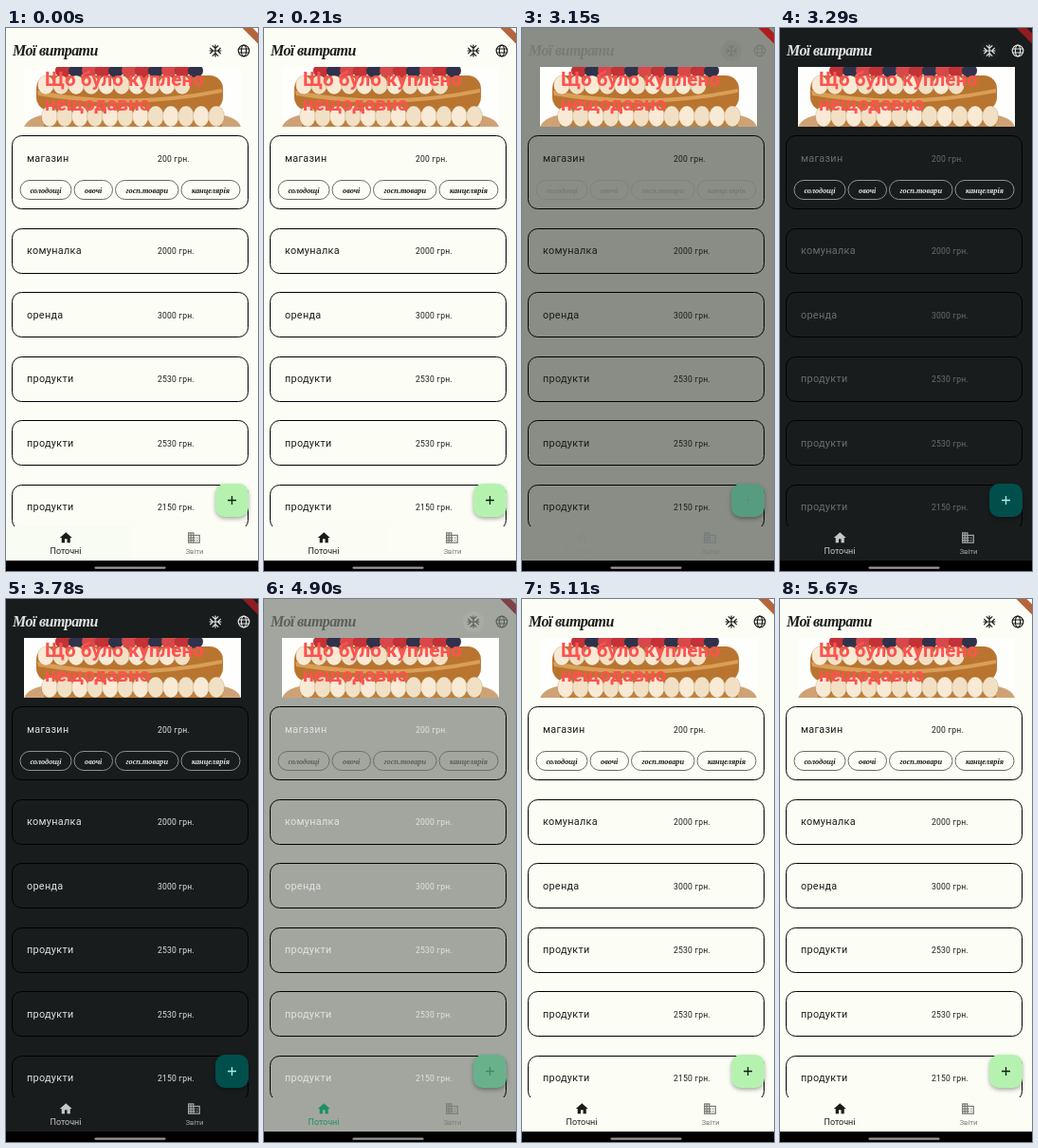
Recreate the animation shown at these times as an HTML page. Size 266 by 572 pixels, loop 8000 ms.

```html
<!DOCTYPE html>
<html lang="uk">
<head>
<meta charset="utf-8">
<style>
  html, body { margin: 0; width: 100%; height: 100%; overflow: hidden; }
  svg { display: block; width: 266px; height: 572px; background: var(--bg); }
  text { font-family: Roboto, "Noto Sans", sans-serif; }
  .script { font: italic bold 16px "Liberation Serif", "Noto Serif", serif; fill: var(--ink); }
  .name { font-size: 10.8px; letter-spacing: .32px; fill: var(--text); }
  .sum { font-size: 8.6px; letter-spacing: .18px; fill: var(--text); }
  .tag { font-size: 8.3px; text-anchor: middle; }
  .head { font-size: 20.6px; font-weight: bold; fill: #ff5151; }
  .card { fill: none; stroke: #000; }
  .chip { fill: none; stroke: var(--chip); }
  .line { fill: none; stroke: var(--ink); stroke-width: 1.2; }
  .mid { text-anchor: middle; }
  .fab { fill: var(--fab); filter: drop-shadow(0 2px 2px #0005); }
</style>
</head>
<body>
<svg viewBox="0 0 266 572">
  <defs>
    <clipPath id="photo"><rect x="19" y="41" width="229" height="63"/></clipPath>
    <clipPath id="view"><rect y="41" width="266" height="484"/></clipPath>
  </defs>

  <text class="script" x="7" y="29" letter-spacing="-.6">Мої витрати</text>
  <circle cx="221" cy="24" r="11" fill="var(--glow)"/>
  <g id="flake" class="line" transform="translate(221 24)"></g>
  <g class="line" transform="translate(251 24)">
    <circle r="5.8"/>
    <ellipse rx="2.6" ry="5.8"/>
    <path d="M-5.3 -2H5.3M-5.3 2H5.3"/>
  </g>
  <path d="M249.5 0H260.4L266 5.6V16.5z" fill="var(--band)"/>

  <g clip-path="url(#photo)">
    <rect x="19" y="41" width="229" height="63" fill="#fefefc"/>
    <path d="M19 104Q24 93 44 91H222Q244 93 248 104z" fill="#cfa275"/>
    <rect x="40" y="84" width="188" height="30" rx="8" fill="#c1803c"/>
    <rect x="32" y="50" width="197" height="37" rx="14" fill="#b9752f"/>
    <path d="M33 66Q130 84 228 64V68Q130 88 34 71z" fill="#d99f58"/>
    <g id="cake"></g>
  </g>
  <text class="head" x="41" y="61">Що було куплено</text>
  <text class="head" x="41" y="87">нещодавно</text>

  <g id="list" clip-path="url(#view)"></g>

  <rect class="fab" x="221" y="480" width="35" height="35" rx="10"/>
  <path d="M234 497.5H243M238.5 493V502" stroke="var(--plus)" stroke-width="1.3"/>

  <rect y="525" width="266" height="36" fill="var(--bg)"/>
  <rect id="press" y="525" width="133" height="36" fill="#2b6b3f"/>
  <path transform="translate(55.5 529.3) scale(.646)" fill="var(--sel)" d="M10 20v-6h4v6h5v-8h3L12 3 2 12h3v8z"/>
  <path transform="translate(190.7 529.3) scale(.646)" fill="var(--off)" fill-rule="evenodd"
    d="M12 7V3H2v18h20V7zM6 19H4v-2h2zm0-4H4v-2h2zm0-4H4V9h2zm0-4H4V5h2zm4 12H8v-2h2zm0-4H8v-2h2zm0-4H8V9h2zm0-4H8V5h2zm10 12h-8v-2h2v-2h-2v-2h2v-2h-2V9h8zm-2-8h-2v2h2zm0 4h-2v2h2z"/>
  <text class="mid" x="63" y="554" font-size="9" fill="var(--sel)">Поточні</text>
  <text class="mid" x="199" y="554" font-size="7.8" fill="var(--off)">Звіти</text>

  <rect y="561" width="266" height="11" fill="#000"/>
  <rect x="93.5" y="567.4" width="75" height="2.4" rx="1.2" fill="#999"/>
</svg>
<script>
const $ = id => document.getElementById(id);

$('flake').innerHTML = [0, 90, 180, 270].map(a =>
  `<path transform="rotate(${a})" d="M0 0V-6.4M-3.2 -5.7L0 -2.5L3.2 -5.7"/>`).join('');

// A row of cream or berry shapes
const dots = (from, to, step, y, rx, ry, fills) => {
  let out = '';
  for (let x = from, i = 0; x <= to; x += step, i++)
    out += `<ellipse cx="${x}" cy="${y}" rx="${rx}" ry="${ry}" fill="${fills[i % fills.length]}" stroke="#5303" stroke-width=".8"/>`;
  return out;
};
const cream = ['#f8ead4', '#f2e0c4'];
$('cake').innerHTML =
  dots(60, 200, 14, 45, 8, 7, ['#c23237', '#30324c', '#d8484a']) +
  dots(42, 200, 16, 60, 8.5, 10, cream) +
  dots(46, 222, 16, 93, 8.5, 11, cream);

const rows = [['магазин', 200], ['комуналка', 2000], ['оренда', 3000],
  ['продукти', 2530], ['продукти', 2530], ['продукти', 2150]];
const chips = [['солодощі', 15, 69], ['овочі', 72, 112.5], ['госп.товари', 115.5, 182], ['канцелярія', 185, 247]];
$('list').innerHTML = rows.map(([name, sum], i) => {
  const top = i ? Math.floor(143.5 + 67.5 * i) : 113;
  const base = i ? Math.floor(171 + 67.5 * i) : 141;
  return `<rect class="card" x="6.5" y="${top + .5}" width="249" height="${i ? 47 : 77}" rx="10"/>
    <text class="name" x="22" y="${base}">${name}</text>
    <text class="sum" x="160" y="${base}">${sum} грн.</text>`;
}).join('') + chips.map(([label, a, b]) =>
  `<rect class="chip" x="${a}" y="160.5" width="${b - a}" height="20" rx="10"/>
   <text class="script tag" x="${(a + b) / 2}" y="173.5">${label}</text>`).join('');

const names = 'bg text ink chip sel off fab plus band glow'.split(' ');
const palette = s => s.split(' ').map(h => [0, 2, 4].map(i => parseInt(h.substr(i, 2), 16)));
const light = palette('fcfef6 1a1c19 1a1c19 686c66 1a1c19 7a7c77 b5f2b0 0b2010 b5653c fcfef6');
const dimming = palette('8a8d86 1a1c19 777a75 7f827c 888b84 787e7f 579c80 53967b b01c1c 858881');
const night = palette('191c1c 6a6d6a e0e3e1 899391 c4c7c5 a0a3a2 004f4c a8efe4 8f1d22 1d2020');
const dark = palette('191c1c e0e3e1 e0e3e1 899391 c4c7c5 a0a3a2 004f4c a8efe4 8f1d22 191c1c');
const rising = palette('a3a69f e0e3e1 5c5f5b 6c706a 1d8f66 7d807b 69b18b 3c8a68 7d4248 a9aca5');
const day = palette('fcfef6 666964 141a16 686c66 123524 7a7c77 b5f2b0 0b2010 7d4248 f4f6ee');

const STEP = 70;
const keys = [[0, light], [3080, light], [3150, dimming], [3220, dimming], [3290, night], [3500, dark],
  [4830, dark], [4900, rising], [4970, day], [5110, light], [8000, light]];

function draw(now) {
  const t = Math.floor(now % 8000 / STEP) * STEP;
  const n = keys.findIndex(k => k[0] > t);
  const [t0, a] = keys[n - 1], [t1, b] = keys[n];
  const f = (t - t0) / (t1 - t0);
  names.forEach((name, i) => {
    const rgb = a[i].map((v, c) => Math.round(v + (b[i][c] - v) * f));
    document.body.style.setProperty('--' + name, `rgb(${rgb})`);
  });
  $('press').setAttribute('opacity', Math.max(0, .012 * (1 - t / 280)));
}

const start = performance.now();
function loop() {
  draw(performance.now() - start);
  requestAnimationFrame(loop);
}
loop();
</script>
</body>
</html>
```
